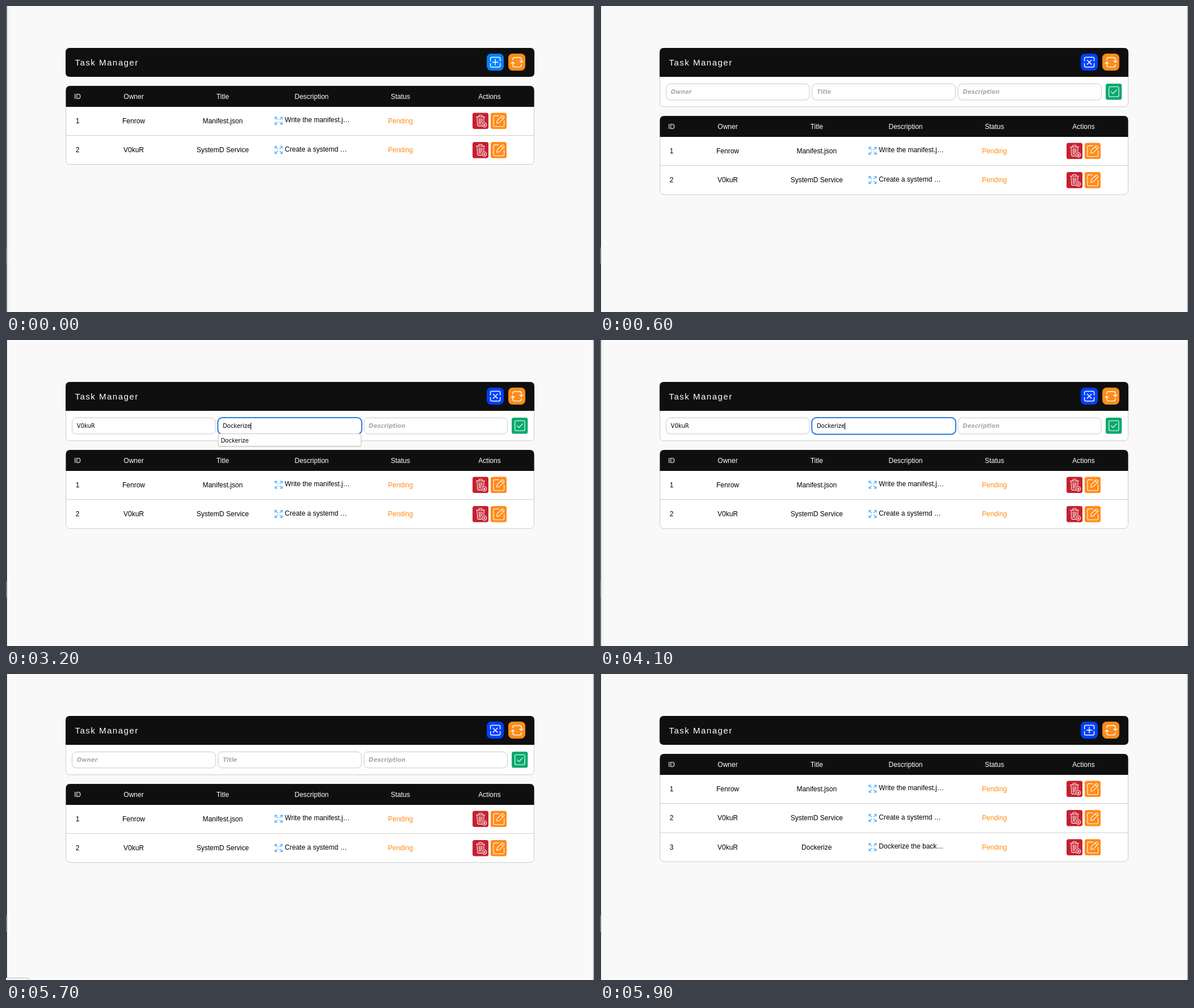
These frames come from a looping animation (1036 by 540 pixels, 7.3 s). An HTML page:

```html
<!DOCTYPE html>
<html lang="en">
<head>
<meta charset="utf-8">
<title>Task Manager</title>
<style>
html, body { margin: 0; width: 100%; height: 100%; overflow: hidden; background: #f9f9f9; }
svg { display: block; width: 1036px; height: 540px; font: 12px "Liberation Sans", Arial, sans-serif; }
.mid { text-anchor: middle; }
.field { font: 10px "DejaVu Sans", sans-serif; }
.hint { font-weight: bold; font-style: italic; fill: #aaa; }
.line { fill: none; stroke: #fff; stroke-linecap: round; stroke-linejoin: round; }
</style>
</head>
<body>
<svg id="stage" viewBox="0 0 1036 540" xmlns="http://www.w3.org/2000/svg">
  <defs>
    <linearGradient id="shade">
      <stop offset="0" stop-color="#ececec"/>
      <stop offset="1" stop-color="#f9f9f9"/>
    </linearGradient>
    <g id="expand" fill="none" stroke="#3aa0f5" stroke-width="1.1" stroke-linejoin="round" stroke-linecap="round">
      <path d="M-6.3-2.8V-6.3H-2.8M2.8-6.3H6.3V-2.8M6.3 2.8V6.3H2.8M-2.8 6.3H-6.3V2.8"/>
      <path d="M-6.3-6.3L-1.9-1.9M6.3-6.3L1.9-1.9M6.3 6.3L1.9 1.9M-6.3 6.3L-1.9 1.9"/>
    </g>
    <g id="trash">
      <rect width="28" height="28.5" rx="3.5" fill="#c62030"/>
      <g class="line" stroke-width="1.1">
        <path d="M6.5 7.2H21.5M10.8 7V5.6Q10.8 4.2 12.2 4.2H15.8Q17.2 4.2 17.2 5.6V7"/>
        <path d="M8 7.4L8.8 21.5Q8.9 23.3 10.7 23.3H16M20.2 7.4L19.7 15.5M11.5 10L11.8 20.5M14 10V20.5M16.7 10L16.4 17"/>
        <circle cx="20.8" cy="21.2" r="4"/>
        <path d="M19.3 19.7L22.3 22.7M22.3 19.7L19.3 22.7"/>
      </g>
    </g>
    <g id="edit">
      <rect width="28" height="28.5" rx="3.5" fill="#ff8c1a"/>
      <g class="line" stroke-width="1.1">
        <path d="M14 5H6.8Q5 5 5 6.8V22.4Q5 24.2 6.8 24.2H21.8Q23.6 24.2 23.6 22.4V14"/>
        <path d="M10.5 18.2L11.4 13.6L19.6 5.4Q20.6 4.4 21.6 5.4L23.3 7.1Q24.3 8.1 23.3 9.1L15.1 17.3ZM18 7L21.7 10.7"/>
      </g>
    </g>
  </defs>

  <rect width="1036" height="540" fill="#f9f9f9"/>
  <rect id="glow" x="1" width="8" height="540" fill="url(#shade)"/>
  <rect id="edge" width="1.6" height="540"/>
  <rect y="426" width="1.2" height="29" fill="#777"/>
  <rect id="rim" x="1034.6" width="1.4" height="540"/>

  <g id="form">
    <path d="M105.5 120V170.5Q105.5 177.8 112.8 177.8H923.2Q930.5 177.8 930.5 170.5V120Z" fill="#fff" stroke="#ccc"/>
    <g id="fields"></g>
    <rect id="send" x="891" y="137" width="28.3" height="28.5" rx="3.5"/>
    <g class="line" stroke-width="1.1">
      <rect x="896.7" y="142.5" width="17.3" height="17.5" rx="2"/>
      <path d="M900.8 151.5L904 154.7L910.2 147.8"/>
    </g>
  </g>

  <path id="bar" fill="#0f0f0f"/>
  <text x="121.5" y="104.6" fill="#fff" font-size="15" letter-spacing="1.5">Task Manager</text>
  <rect id="add" x="847" y="84" width="30" height="30" rx="7.5"/>
  <g class="line" stroke-width="1.5">
    <path d="M853.6 97V92.8Q853.6 90.6 855.8 90.6H868.4Q870.6 90.6 870.6 92.8V97M870.6 101.5V105.6Q870.6 107.8 868.4 107.8H855.8Q853.6 107.8 853.6 105.6V101.5"/>
    <path id="sign"/>
  </g>
  <rect x="885" y="84" width="30" height="30" rx="7.5" fill="#ff8c1a"/>
  <path class="line" stroke-width="1.4" d="M893 95V94Q893 91 896 91H905Q908 91 908 94V99.5M905.2 97L908 99.8L910.8 97M908 103.5V104.6Q908 107.6 905 107.6H896Q893 107.6 893 104.6V99M890.2 101.6L893 98.8L895.8 101.6"/>

  <g id="table"></g>

  <g id="list">
    <rect x="373" y="167" width="253.5" height="22" rx="4" fill="#000" opacity=".09"/>
    <rect x="373.8" y="165.5" width="252" height="21.8" rx="3.5" fill="#fff" stroke="#c4c4c4"/>
    <text class="field" x="378.4" y="180.6">Dockerize</text>
  </g>
  <rect id="panel" x="-6" y="536.5" width="47" height="12" rx="3" fill="#f9f9fb" stroke="#bbb"/>
</svg>
<script>
const LOOP = 7300;
const $ = id => document.getElementById(id);
const show = (el, on) => el.setAttribute('visibility', on ? 'inherit' : 'hidden');
const set = (id, name, value) => $(id).setAttribute(name, value);
const during = (t, a, b) => t >= a && t < b;

const columns = [126, 225, 381.8, 538.5, 695, 852];
const tasks = [
  ['Fenrow', 'Manifest.json', 'Write the manifest.j…'],
  ['V0kuR', 'SystemD Service', 'Create a systemd …'],
  ['V0kuR', 'Dockerize', 'Dockerize the back…']
];
const PITCH = 51.5;

const cell = (col, y, text, fill) =>
  `<text class="mid" x="${columns[col]}" y="${y}" fill="${fill}">${text}</text>`;

function taskRow([owner, title, note], i) {
  const y = 178 + i * PITCH;
  return `<g id="row${i}">
    ${i ? `<path d="M105 ${y - 1}H931" stroke="#ccc"/>` : ''}
    ${cell(0, y + 28.7, i + 1, '#000')}${cell(1, y + 28.7, owner, '#000')}${cell(2, y + 28.7, title, '#000')}
    <use href="#expand" x="480.4" y="${y + 24.5}"/>
    <text x="491.3" y="${y + 27.2}">${note}</text>
    ${cell(4, y + 28.7, 'Pending', '#ff8c1a')}
    <use href="#trash" x="822" y="${y + 10.6}"/><use href="#edit" x="854" y="${y + 10.6}"/>
  </g>`;
}

const heads = ['ID', 'Owner', 'Title', 'Description', 'Status', 'Actions'];
$('table').innerHTML =
  `<rect id="frame" x="105.5" y="141.3" width="825" rx="7.3" fill="#fff" stroke="#ccc"/>
   <path d="M105.5 178V148.5Q105.5 141 113 141H923Q930.5 141 930.5 148.5V178Z" fill="#0f0f0f"/>` +
  heads.map((h, i) => cell(i, 163.7, h, '#fff')).join('') + tasks.map(taskRow).join('');

// Each field: value, when it gains and loses focus, when its text is entered
const fields = [
  { hint: 'Owner', text: 'V0kuR', x: 116.5, focus: 1300, typed: 2200, blur: 3000 },
  { hint: 'Title', text: 'Dockerize', x: 373.6, focus: 3100, typed: 3200, blur: 4900 },
  { hint: 'Description', text: 'Dockerize the backend', x: 630.8, focus: 5000, typed: 5100, blur: 5500 }
];
const CLEAR = 5600;

for (const f of fields) {
  const g = document.createElementNS('http://www.w3.org/2000/svg', 'g');
  g.innerHTML = `<rect y="137.4" x="${f.x}" width="252.6" height="28.4" rx="7.3" fill="#fff" stroke="#c8c8c8"/>
    <rect y="137" x="${f.x - .4}" width="253.6" height="29.4" rx="8" fill="none" stroke="#2c7be0" stroke-width="2"/>
    <text class="field hint" x="${f.x + 8.3}" y="155.4">${f.hint}</text>
    <text class="field" x="${f.x + 8.3}" y="155.4">${f.text}</text>
    <rect y="146" width="1" height="12"/>`;
  $('fields').append(g);
  [, f.ring, f.ghost, f.value, f.caret] = g.children;
}

function draw(t) {
  const open = during(t, 600, 5800);
  const soft = t < 500 || during(t, 2200, 2300) || during(t, 3000, 3200) || during(t, 3900, 4900) || during(t, 5000, 5100);
  const softRim = soft && !during(t, 3900, 4100);
  const rows = t < 5900 ? 2 : 3;

  set('edge', 'fill', soft ? '#4c4c4c' : '#1c1c1c');
  set('rim', 'fill', softRim ? '#c8c8c8' : '#a0a0a0');
  show($('glow'), soft);

  show($('form'), open);
  set('bar', 'd', 'M105 125V81.5Q105 74 112.5 74H923.5Q931 74 931 81.5V' +
    (open ? '125Z' : '117.5Q931 125 923.5 125H112.5Q105 125 105 117.5Z'));
  set('add', 'fill', t < 500 ? '#0080ff' : '#0040ff');
  set('sign', 'd', open ? 'M858.4 95.5L865.8 102.9M865.8 95.5L858.4 102.9' : 'M857.2 99.2H867M862.1 94.3V104.1');
  set('send', 'fill', during(t, 5300, 5500) ? '#078a58' : '#0aa96c');

  for (const f of fields) {
    const focused = during(t, f.focus, f.blur);
    const filled = during(t, f.typed, CLEAR);
    show(f.ring, focused);
    f.ring.setAttribute('opacity', t < f.focus + 100 ? .6 : 1);
    show(f.ghost, !filled);
    show(f.value, filled);
    show(f.caret, focused);
    const end = filled ? f.value.getComputedTextLength() : 0;
    f.caret.setAttribute('x', Math.round(f.x + 8 + end));
  }

  set('table', 'transform', `translate(0 ${open ? 53 : 0})`);
  set('frame', 'height', 36.7 + rows * PITCH - 1.3);
  show($('row2'), rows === 3);
  show($('list'), during(t, 3200, 3900));
  show($('panel'), during(t, 5700, 5800));
}

const start = performance.now();
function tick() {
  draw((performance.now() - start) % LOOP);
  requestAnimationFrame(tick);
}
tick();
</script>
</body>
</html>
```
